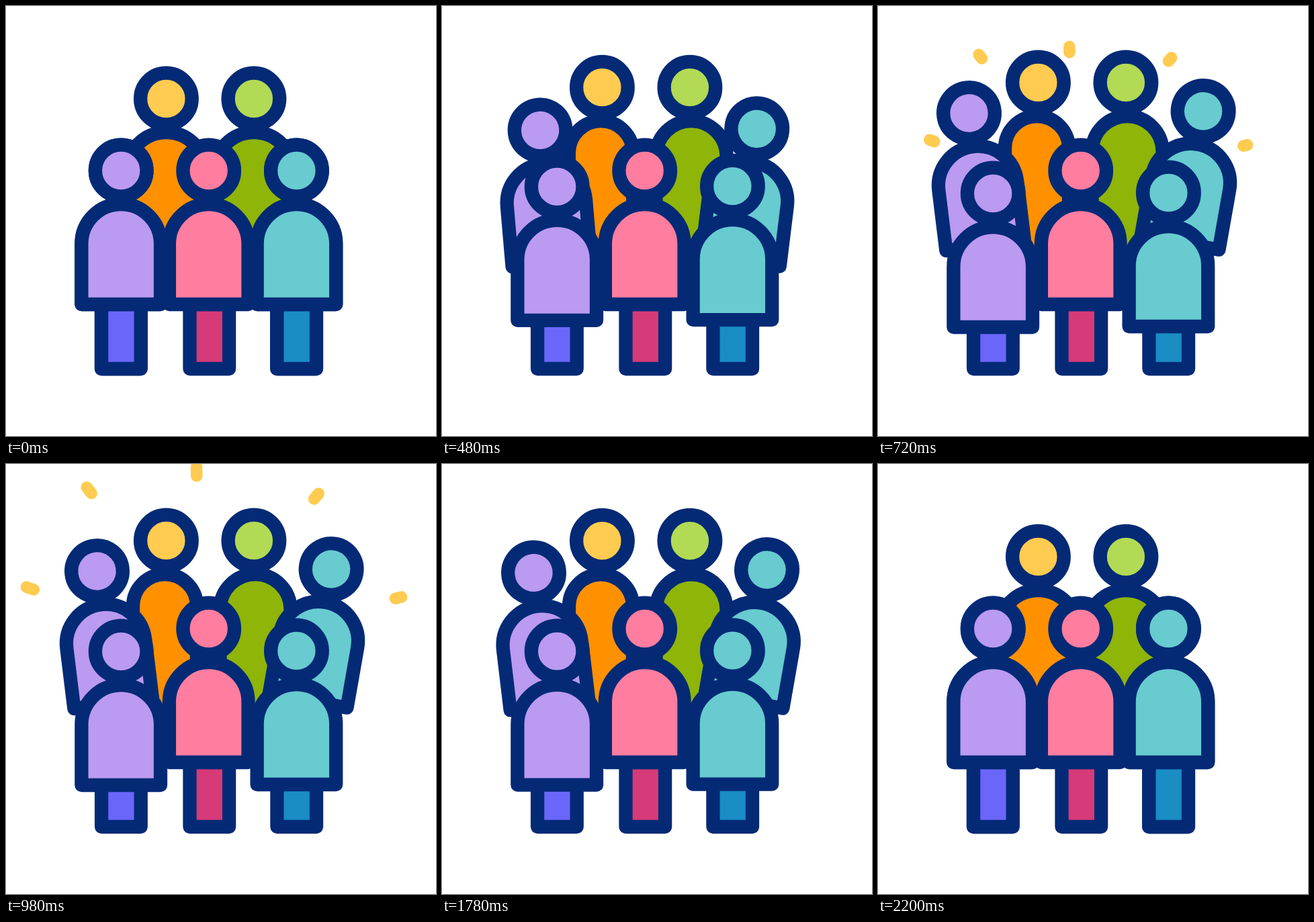
Animation of 640 by 640 pixels, one loop 2.56 s. Source, as an HTML page with a canvas:

```html
<!DOCTYPE html>
<html lang="en">
<head>
<meta charset="utf-8">
<title>Growing group</title>
<style>
html, body { margin: 0; width: 100%; height: 100%; overflow: hidden; background: #fff; }
canvas { display: block; }
</style>
</head>
<body>
<canvas id="stage" width="640" height="640"></canvas>
<script>
const ctx = document.getElementById('stage').getContext('2d');
const LOOP = 2560, NAVY = '#042a76', YELLOW = '#ffcb50';

// Colours: head, body, legs
const PURPLE = ['#bb9af1', '#bb9af1', '#6a66fa'];
const PINK = ['#ff7d9f', '#ff7d9f', '#d63a78'];
const TEAL = ['#67cbd0', '#67cbd0', '#1a8dc5'];
const ORANGE = [YELLOW, '#ff9100'];
const GREEN = ['#b2da54', '#8fb508'];

// Confetti lines: inner end, outer end
const RAYS = [
  [83.8, 201.6, 30, 183],
  [154.5, 78, 119.8, 34.3],
  [285, 69, 283.5, 4],
  [432.4, 82, 465.6, 43.8],
  [543.8, 208.2, 589, 198]
];

const lerp = (a, b, k) => a + (b - a) * k;

function ease(t, start, duration) {
  const u = Math.min(1, Math.max(0, (t - start) / duration));
  return u * u * (3 - 2 * u);
}

function paint(fill) {
  ctx.fillStyle = fill;
  ctx.fill();
  ctx.stroke();
}

function head(x, y, fill) {
  ctx.beginPath();
  ctx.arc(x, y, 38.3, 0, Math.PI * 2);
  paint(fill);
}

function torso(x, top, radius, bottom, fill) {
  ctx.beginPath();
  ctx.moveTo(x - radius, bottom);
  ctx.arc(x, top + radius, radius, Math.PI, 0);
  ctx.lineTo(x + radius, bottom);
  ctx.closePath();
  paint(fill);
}

// Full figure placed by its head centre; legShift keeps the feet planted
function person([face, body, legs], x, y, degrees = 0, legShift = 0, legX = 0) {
  ctx.save();
  ctx.translate(x, y);
  ctx.rotate(degrees * Math.PI / 180);
  ctx.beginPath();
  ctx.rect(legX - 29.3, 199 - legShift, 58.6, 96);
  paint(legs);
  torso(0, 50, 58.8, 199, body);
  head(0, 0, face);
  ctx.restore();
}

// Rear figure, visible only from the waist up
function bust([face, body], x, p, slimX, slimRadius) {
  const y = 138 - 24 * p, slim = Math.min(1, p * 1.4);
  torso(lerp(x, slimX, slim), y + 50, lerp(58.8, slimRadius, slim), 400, body);
  head(x, y, face);
}

function rays(t) {
  const tip = ease(t, 640, 360), tail = ease(t, 728, 360);
  if (tail >= tip) return;
  ctx.strokeStyle = YELLOW;
  ctx.lineWidth = 17.5;
  for (const [x0, y0, x1, y1] of RAYS) {
    ctx.beginPath();
    ctx.moveTo(lerp(x0, x1, tail), lerp(y0, y1, tail));
    ctx.lineTo(lerp(x0, x1, tip), lerp(y0, y1, tip));
    ctx.stroke();
  }
}

function draw(t) {
  const enter = ease(t, 200, 440);
  const p = enter - ease(t, 1755, 427);
  const early = enter - ease(t, 1740, 410);

  ctx.clearRect(0, 0, 640, 640);
  ctx.lineCap = ctx.lineJoin = 'round';
  rays(t);

  ctx.strokeStyle = NAVY;
  ctx.lineWidth = 20.3;
  bust(ORANGE, 238.4, p, 236.5, 47.5);
  bust(GREEN, 368.9, p, 371, 52.5);
  person(PURPLE, 171.2 - 35.7 * early, 245 - 85.5 * early, -7 * early);
  person(TEAL, 432.4 + 51.7 * p, 245 - 88.5 * p, 10 * p);
  person(PURPLE, 171.2, 245 + 34 * p, 0, 34 * p, 0.2);
  person(TEAL, 432.4, 245 + 33 * p, 0, 33 * p, 0.3);
  person(PINK, 301.7, 245, 0, 0, 1.1);
}

function tick() {
  draw(performance.now() % LOOP);
  requestAnimationFrame(tick);
}
tick();
</script>
</body>
</html>
```
